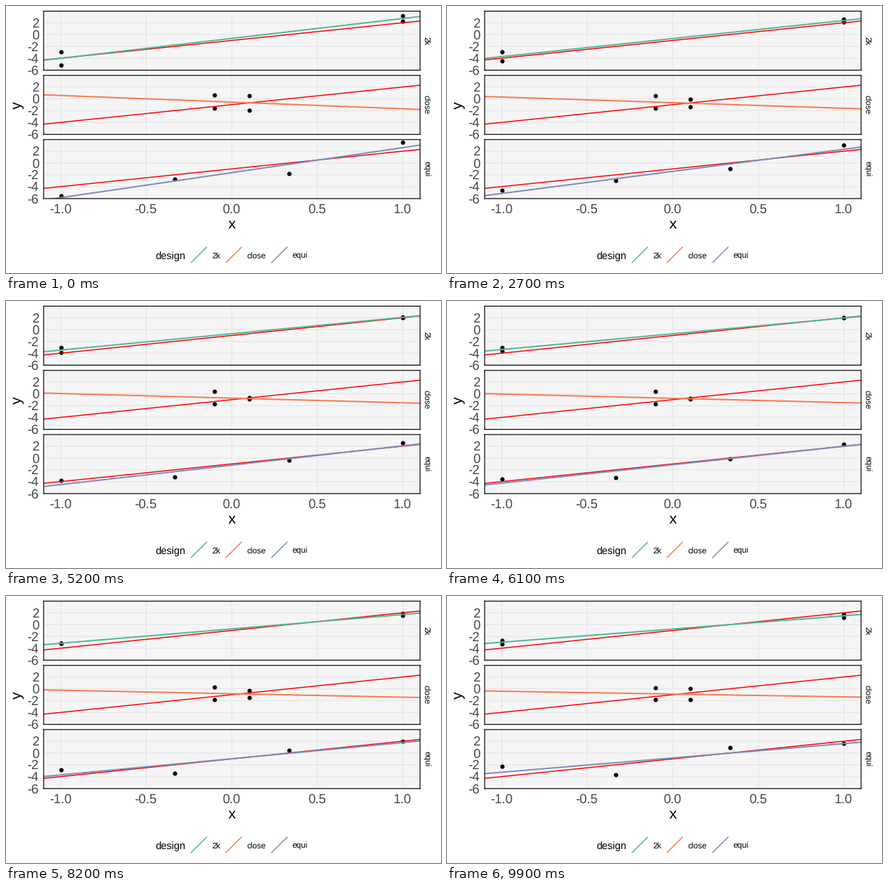
Animation of 624 by 384 pixels, one loop 10000 ms. Source, as a matplotlib script:

```python
import numpy as np
import matplotlib.pyplot as plt
from matplotlib.animation import FuncAnimation
from matplotlib.lines import Line2D

plt.rcParams.update({"font.family": "Liberation Sans", "path.snap": False,
                     "text.hinting": "none"})

W, H, DPI = 624, 384, 96
FRAMES, INTERVAL = 100, 100
PX = 72 / DPI  # one pixel in points

LEFT, WIDTH = 54, 540
TOP, HEIGHT, PITCH = 7.4, 84.9, 92.35
XLIM, YLIM = np.array([-1.1, 1.1]), np.array([-6.03, 3.965])
XTICKS, YTICKS = np.linspace(-1, 1, 5), range(-6, 3, 2)
SMALL, INK, GREY = 8.8, "black", "#474747"
KEY = 23.04  # side of a legend key


def truth(x):
    return 3 * x - 1


# name: colour, x, noise around the truth at the start and at the end
DESIGNS = {
    "2k": ("#53B693", np.repeat([-1, 1], 2),
           [1.11, -1.14, 1.19, 0.25], [0.77, 1.25, -0.81, -0.22]),
    "close": ("#FA7A50", np.repeat([-0.1, 0.1], 2),
              [1.95, -0.26, 1.28, -1.24], [1.48, -0.57, -1.18, 0.7]),
    "equi": ("#7C8CBD", np.linspace(-1, 1, 4),
             [-1.58, -0.72, -1.75, 1.51], [1.77, -1.66, 0.92, -0.37]),
}

fig = plt.figure(figsize=(W / DPI, H / DPI), dpi=DPI, facecolor="white")


def label(x, y, s, size, color=INK, ha="center", va="baseline", **kw):
    fig.text(x / W, 1 - y / H, s, fontsize=size, color=color, ha=ha, va=va, **kw)


def add_panel(top, name, color, x):
    ax = fig.add_axes([LEFT / W, 1 - (top + HEIGHT) / H, WIDTH / W, HEIGHT / H],
                      facecolor="#F5F5F5")
    ax.set(xlim=XLIM, ylim=YLIM, xticks=XTICKS, yticks=YTICKS)
    ax.tick_params(length=0, labelleft=False, labelbottom=False)
    ax.grid(color="#E8E8E8", lw=1.5 * PX)
    ax.set_axisbelow(True)
    for spine in ax.spines.values():
        spine.set_linewidth(1.2 * PX)

    for v in YTICKS:
        y = top + HEIGHT * (YLIM[1] - v) / np.ptp(YLIM)
        label(47.2, y + 6.6, v, 14, GREY, ha="right")
    label(597, top + HEIGHT / 2, name, SMALL, ha="left", va="center",
          rotation=-90)

    dots, = ax.plot(x, truth(x), "o", color=INK, ms=6.2 * PX, mew=0)
    ax.plot(XLIM, truth(XLIM), color="red", lw=1.5 * PX)
    fit, = ax.plot([], [], color=color, lw=2 * PX)
    return dots, fit


def add_key(x, name, color):
    fig.add_artist(Line2D([x / W, (x + KEY) / W],
                          [1 - 369.4 / H, 1 - (369.4 - KEY) / H],
                          color=color, lw=1.5 * PX, solid_capstyle="butt"))
    label(x + 30.3, 363, name, SMALL, ha="left")


panels = []
for i, (name, (color, x, *_)) in enumerate(DESIGNS.items()):
    panels.append(add_panel(TOP + i * PITCH, name, color, x))

for v in XTICKS:
    label(LEFT + WIDTH * (v - XLIM[0]) / np.ptp(XLIM) - 0.7, 298, f"{v:.1f}",
          14, GREY)
label(324, 319.7, "x", 16)
label(26.3, 142.2, "y", 16, ha="right", va="center", rotation=90)

label(214.6, 364, "design", 11, ha="left")
for x, (name, (color, *_)) in zip((265.2, 315.2, 380.6), DESIGNS.items()):
    add_key(x, name, color)


def update(n):
    t = n / (FRAMES - 1)
    for (dots, fit), (_, x, start, end) in zip(panels, DESIGNS.values()):
        y = truth(x) + (1 - t) * np.array(start) + t * np.array(end)
        dots.set_ydata(y)
        fit.set_data(XLIM, np.polyval(np.polyfit(x, y, 1), XLIM))
    return [artist for pair in panels for artist in pair]


anim = FuncAnimation(fig, update, frames=FRAMES, interval=INTERVAL,
                     repeat=True, repeat_delay=0)
plt.show()
```
